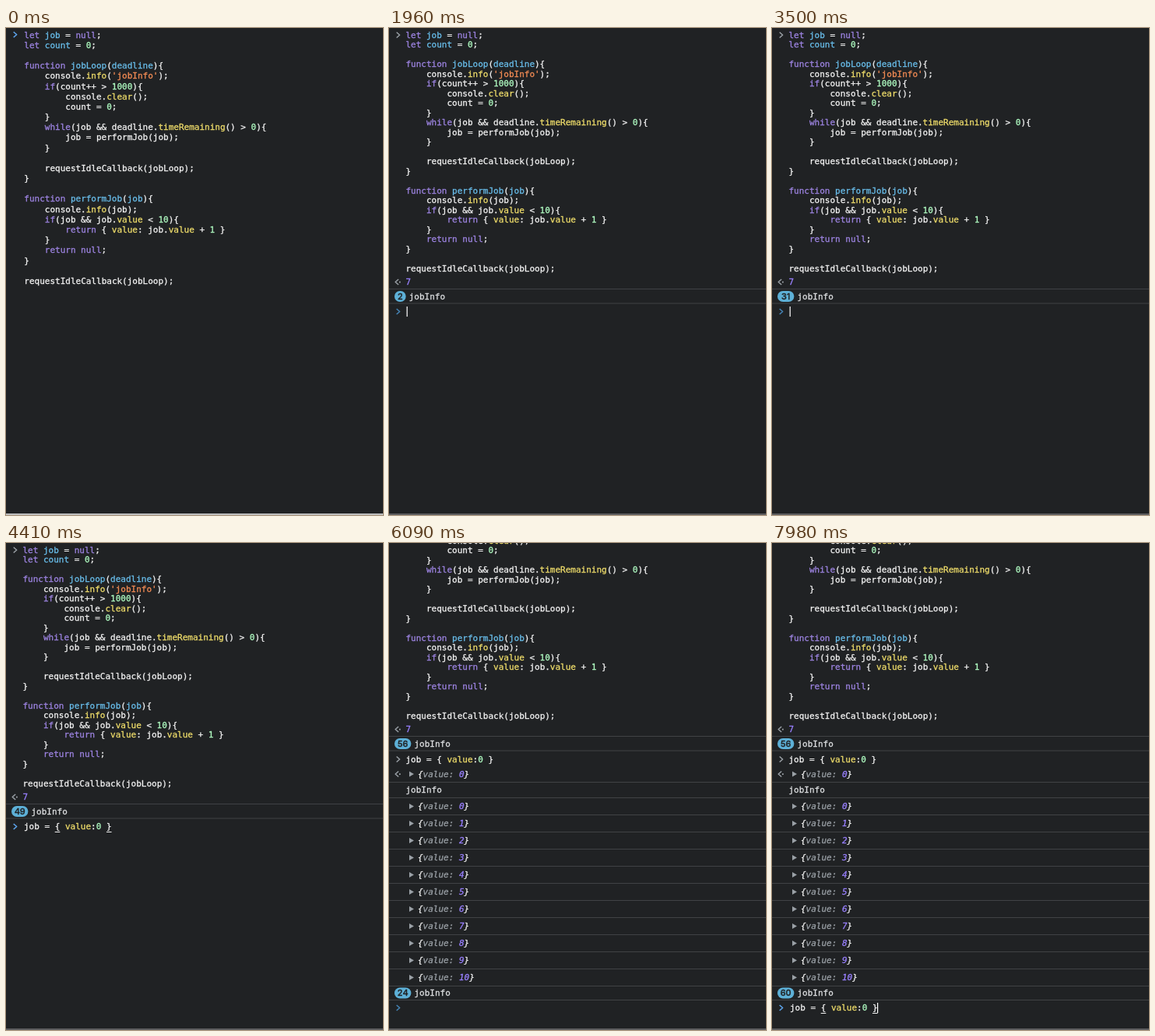
Animation of 484 by 626 pixels, one loop 8 s. Source, as an HTML page with a canvas:

```html
<!DOCTYPE html>
<html lang="en">
<head>
<meta charset="utf-8">
<title>Console</title>
<style>
  html, body { margin: 0; width: 100%; height: 100%; overflow: hidden; background: #202224; }
  canvas { display: block; }
</style>
</head>
<body>
<canvas id="stage" width="484" height="626"></canvas>
<script>
const ctx = document.getElementById('stage').getContext('2d');
const W = 484, H = 626, LOOP = 8000, STEP = 70;
const CHAR = 6.62;
const MONO = '11px "DejaVu Sans Mono", monospace';

const C = {
  bg: '#202224', rule: '#404245', bar: '#5c5d5f', brightBar: '#bcbcbc',
  text: '#f2f2f2', log: '#dcdee0', gray: '#9aa0a6',
  key: '#9c83e0', num: '#aefac0', def: '#68bdea', prop: '#eedc6a', str: '#f28b54',
  value: '#9980ff', badge: '#5db0d7', prompt: '#5fa8f2', idle: '#4585b8'
};

const SCRIPT = `let job = null;
let count = 0;

function jobLoop(deadline){
    console.info('jobInfo');
    if(count++ > 1000){
        console.clear();
        count = 0;
    }
    while(job && deadline.timeRemaining() > 0){
        job = performJob(job);
    }

    requestIdleCallback(jobLoop);
}

function performJob(job){
    console.info(job);
    if(job && job.value < 10){
        return { value: job.value + 1 }
    }
    return null;
}

requestIdleCallback(jobLoop);`.split('\n');
const ASSIGN = 'job = { value:0 }';

const TOKEN = new RegExp([
  "(?<str>'[^']*')",
  '(?<key>\\b(?:let|function|if|while|return|null)\\b)',
  '(?<def>(?<=let |function |function \\w+\\()\\w+)',
  '(?<prop>(?<=\\.)\\w+|\\bvalue(?=:))',
  '(?<num>\\b\\d+)',
  "(?<text>\\w+|[^\\w\\s']+)"
].join('|'), 'g');

// Moments (ms) of the user's actions, and of each caret change.
const FOCUS = 630, RUN = 1890, RECALL = 3710, ASSIGNED = 4760, RECALL_AGAIN = 7700;
const CARET = [
  [0, 0], [FOCUS, 1], [1120, 0], [1750, 1], [2450, 0], [3010, 1], [3570, 0], [RECALL, 1],
  [4270, 0], [ASSIGNED, 1], [5600, 0], [6160, 1], [6720, 0], [7280, 1]
];
const PAUSES = [2660, 6510];
const SCROLL = 87;

// A hairline outline gives the slightly heavy weight of smoothed screen text.
function text(s, x, mid, color, font = MONO) {
  const y = Math.round(mid + 3.6);
  ctx.font = font;
  ctx.fillStyle = ctx.strokeStyle = color;
  ctx.lineWidth = 0.3;
  ctx.lineJoin = 'round';
  ctx.fillText(s, x, y);
  ctx.strokeText(s, x, y);
}

function code(line, x, mid) {
  for (const m of line.matchAll(TOKEN)) {
    const kind = Object.keys(m.groups).find(k => m.groups[k] !== undefined);
    text(m[0], x + m.index * CHAR, mid, C[kind]);
  }
}

function script(x, lineHeight) {
  SCRIPT.forEach((line, i) => code(line, x, 9 + i * lineHeight));
}

function rule(y) {
  ctx.fillStyle = C.rule;
  ctx.fillRect(0, y, W, 1);
}

function chevron(x, mid, dir, color) {
  ctx.strokeStyle = color;
  ctx.lineWidth = 1.5;
  ctx.beginPath();
  ctx.moveTo(x - 2 * dir, mid - 3.5);
  ctx.lineTo(x + 2 * dir, mid);
  ctx.lineTo(x - 2 * dir, mid + 3.5);
  ctx.stroke();
}

function returned(mid) {
  chevron(10.2, mid, -1, C.gray);
  ctx.fillStyle = C.gray;
  ctx.fillRect(13, mid - 0.8, 1.8, 1.8);
}

function preview(n, mid) {
  ctx.fillStyle = C.gray;
  ctx.beginPath();
  ctx.moveTo(26, mid - 3.5);
  ctx.lineTo(32, mid);
  ctx.lineTo(26, mid + 3.5);
  ctx.fill();
  const font = 'italic ' + MONO, digits = String(n);
  const put = (s, col, color) => text(s, 37 + col * CHAR, mid, color, font);
  put('{', 0, C.text);
  put('value:', 1, C.gray);
  put(digits, 8, C.value);
  put('}', 8 + digits.length, C.text);
}

function logged(n, mid) {
  let x = 21.5;
  if (n > 1) {
    const w = 8 + 6.7 * String(n).length;
    ctx.fillStyle = C.badge;
    ctx.beginPath();
    ctx.roundRect(7, mid - 7, w, 14, 7);
    ctx.fill();
    ctx.textAlign = 'center';
    text(n, 7 + w / 2, mid, C.bg, '500 11px Inter, sans-serif');
    ctx.textAlign = 'left';
    x = 11 + w;
  }
  text('jobInfo', x, mid, C.log);
}

function caret(x, mid) {
  ctx.fillStyle = '#fff';
  ctx.fillRect(x, mid - 6.5, 1.2, 13);
}

function prompt(mid, filled, caretOn) {
  chevron(11.7, mid, 1, filled ? C.prompt : C.idle);
  if (filled) {
    code(ASSIGN, 23, mid);
    ctx.fillStyle = C.text;
    for (const col of [6, 16]) ctx.fillRect(23 + col * CHAR, Math.round(mid + 6), CHAR, 1);
  }
  if (caretOn) caret(filled ? 135 : 22.6, mid);
}

const repeats = (t, start) => Math.max(1, 1 + Math.floor((t - start) / 52.5));

function firstRun(n) {
  chevron(11.7, 9, 1, C.gray);
  script(21.5, 12.5);
  returned(326.5);
  text('7', 21.5, 326.5, C.value);
  rule(335);
  logged(n, 345);
  rule(353.5);
}

function secondRun(n) {
  chevron(11.7, 278, 1, C.gray);
  code(ASSIGN, 21.5, 278);
  returned(297);
  preview(0, 297);
  rule(307);
  logged(1, 317.5);
  rule(327);
  for (let i = 0; i <= 10; i++) {
    preview(i, 338.5 + 22 * i);
    rule(349 + 22 * i);
  }
  logged(n, 578.5);
  rule(587);
}

function draw(time) {
  const t = Math.floor(time / STEP) * STEP;
  const tick = PAUSES.includes(t) ? t - STEP : t;
  const caretOn = CARET.findLast(([at]) => at <= t)[1];

  ctx.fillStyle = C.bg;
  ctx.fillRect(0, 0, W, H);

  if (t < RUN) {
    chevron(11.7, 8.5, 1, C.prompt);
    script(23.3, 13.18);
    if (caretOn) caret(122.2, 8.5);
  } else if (t < ASSIGNED) {
    firstRun(repeats(tick, 1880));
    prompt(364.5, t >= RECALL, caretOn);
  } else {
    ctx.save();
    ctx.translate(0, -SCROLL);
    firstRun(56);
    ctx.restore();
    secondRun(repeats(tick, 4850));
    prompt(597.5, t >= RECALL_AGAIN, caretOn);
  }

  ctx.fillStyle = t < FOCUS ? C.brightBar : C.bar;
  ctx.fillRect(0, H - 2, W, 2);
}

const origin = performance.now();
function frame() {
  draw((performance.now() - origin) % LOOP);
  requestAnimationFrame(frame);
}
frame();
</script>
</body>
</html>
```
